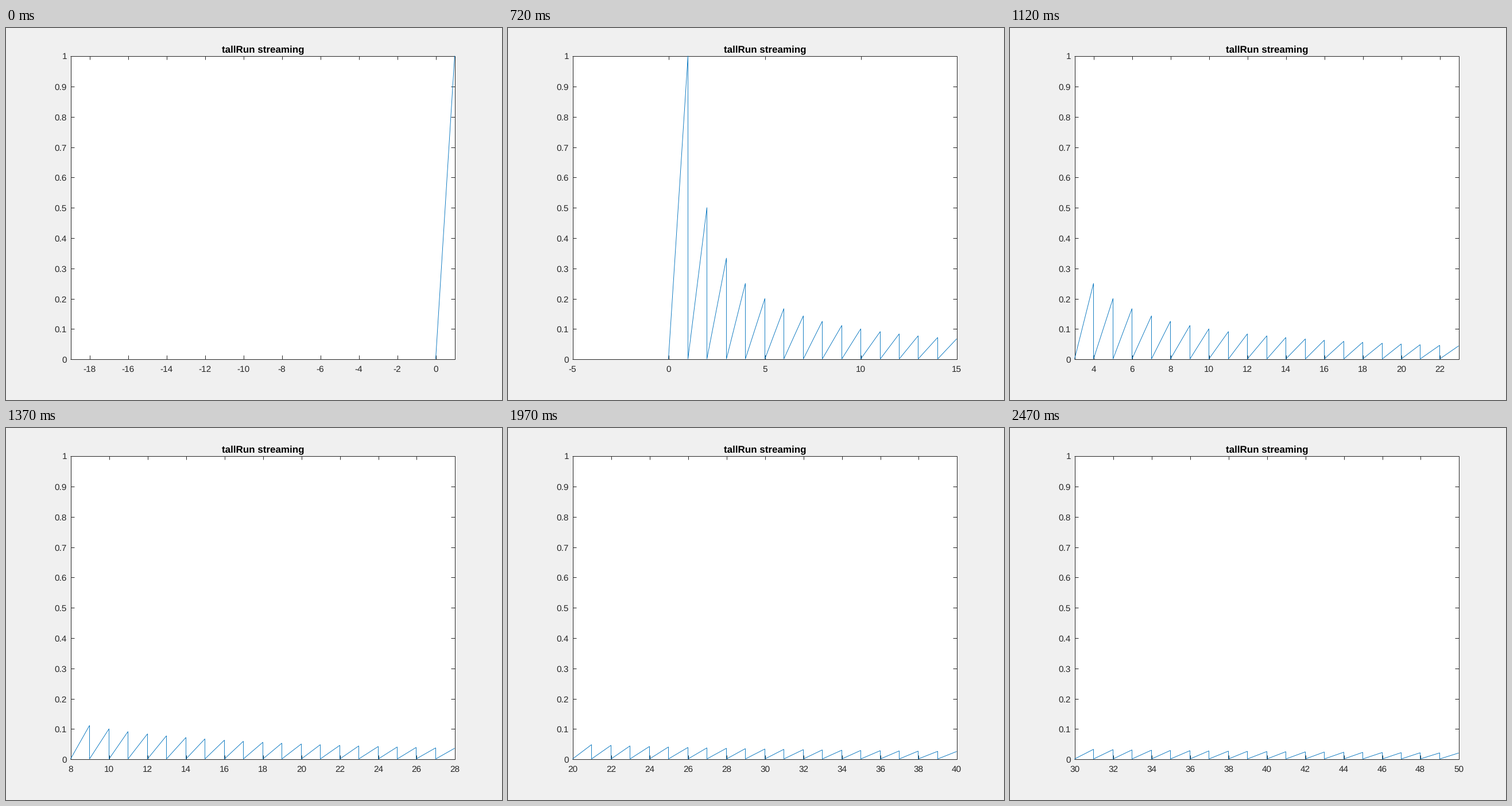
A matplotlib script that plays this animation: 864x648 px, repeating every 2520 ms.

```python
import math

import matplotlib.pyplot as plt
from matplotlib.animation import FuncAnimation
from matplotlib.collections import LineCollection

W, H, DPI = 864, 648, 100
PX = 72 / DPI  # points per pixel
STEP_MS, LOOP_MS = 10, 2520
SPAN = 20

# Plot box as fractions of the stage, in pixels from the top left
LEFT, RIGHT = 0.13 * W, 0.905 * W
TOP, BOTTOM = 0.075 * H, 0.89 * H
TICK = 6.5
INK = "#262626"

plt.rcParams["font.family"] = "Liberation Sans"
plt.rcParams["text.hinting"] = "none"

fig = plt.figure(figsize=(W / DPI, H / DPI), dpi=DPI, facecolor="#f0f0f0")
ax = fig.add_axes([0, 0, 1, 1])
ax.set_xlim(0, W)
ax.set_ylim(H, 0)
ax.axis("off")


def crisp(v):
    """Centre of the pixel that holds v."""
    return math.floor(v + 1e-6) + 0.5


x0, x1, y0, y1 = (crisp(v) for v in (LEFT, RIGHT, TOP, BOTTOM))


def to_x(v, n):
    return crisp(LEFT + (v - n + SPAN) / SPAN * (RIGHT - LEFT))


def to_y(v):
    return BOTTOM - v * (BOTTOM - TOP)


def label(x, y, text="", align="center", size=15.43, **style):
    return ax.text(x, y, text, ha=align, va="baseline",
                   fontsize=size * PX, **{"color": INK, **style})


def ink_lines(segments):
    lines = LineCollection(segments, colors=INK, linewidths=PX, zorder=2)
    ax.add_collection(lines, autolim=False)
    return lines


def ticks_for(n):
    """Steps of two, or of five where only those meet both limits."""
    step = 5 if n % 10 == 5 else 2
    first = math.ceil((n - SPAN) / step) * step
    return range(first, n + 1, step)


def saw_points(n):
    """Teeth of height 1/k rising over [k-1, k] inside the window."""
    points = []
    for k in range(max(1, n - SPAN + 1), n + 1):
        points += [(to_x(k - 1, n), crisp(to_y(0))),
                   (to_x(k, n), to_y(1 / k))]
    return points


ax.add_patch(plt.Rectangle((x0, y0), x1 - x0, y1 - y0, fc="white", ec="none",
                           zorder=1))

frame_lines = [
    [(x0 - 0.5, y0), (x1 + 0.5, y0)], [(x0 - 0.5, y1), (x1 + 0.5, y1)],
    [(x0, y0), (x0, y1)], [(x1, y0), (x1, y1)],
]
for i in range(11):
    y = crisp(to_y(i / 10))
    frame_lines += [[(x0, y), (x0 + TICK, y)], [(x1 - TICK, y), (x1, y)]]
    label(106, y + 6, f"{i / 10:g}", "right")
ink_lines(frame_lines)

label(447.5, 42.3, "tallRun streaming", size=16.97, weight="bold",
      color="black")

x_ticks = ink_lines([])
x_labels = [label(0, 598.8) for _ in range(11)]
saw, = ax.plot([], [], color="#0072bd", lw=0.9 * PX, zorder=3,
               solid_joinstyle="bevel", solid_capstyle="butt")
saw.set_clip_path(plt.Rectangle((x0 - 0.5, y0 - 0.5), x1 - x0 + 1,
                                y1 - y0 + 1, transform=ax.transData))


def update(i):
    n = max(1, (i * STEP_MS - 20) // 50 + 1)
    values = list(ticks_for(n))
    segments = []
    for v in values:
        x = to_x(v, n)
        segments += [[(x, y1), (x, y1 - TICK)], [(x, y0), (x, y0 + TICK)]]
    x_ticks.set_segments(segments)

    for j, text in enumerate(x_labels):
        shown = j < len(values)
        text.set_visible(shown)
        if shown:
            text.set_text(str(values[j]))
            text.set_x(to_x(values[j], n))

    saw.set_data(*zip(*saw_points(n)))
    return [x_ticks, saw, *x_labels]


anim = FuncAnimation(fig, update, frames=LOOP_MS // STEP_MS,
                     interval=STEP_MS, repeat=True, repeat_delay=0)
plt.show()
```
